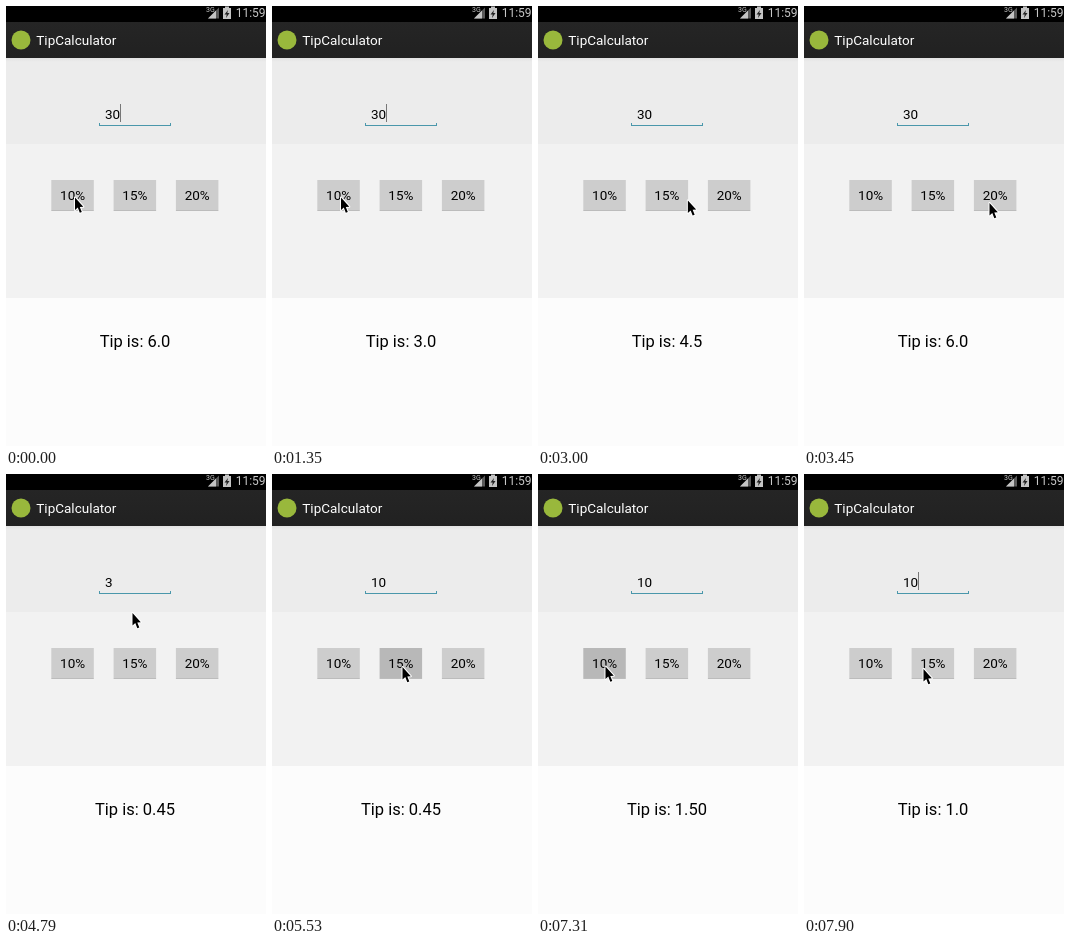
Animation, 260 px wide and 440 px high, one loop 8000 ms. Source, as an HTML page with a canvas:

```html
<!DOCTYPE html>
<html lang="en">
<head>
<meta charset="utf-8">
<title>Tip calculator</title>
<style>
  html, body { margin: 0; width: 100%; height: 100%; overflow: hidden; background: #fcfcfc; }
  canvas { display: block; width: 260px; height: 440px; }
</style>
</head>
<body>
<canvas></canvas>
<script>
const W = 260, H = 440, LOOP = 8000;
const canvas = document.querySelector('canvas');
const ctx = canvas.getContext('2d');
const dpr = window.devicePixelRatio || 1;
canvas.width = W * dpr;
canvas.height = H * dpr;

// The screen refreshes in ticks, slightly faster in the second part.
const tickAt = ms => Math.floor(Math.min(ms, 3600) / 150 + Math.max(0, ms - 3600) / 148);

// Button taps, in ticks; a new amount shows on press, its tip on release.
const taps = [
  { down: 7, up: 9, button: 0, amount: '30', tip: '3.0' },
  { down: 15, up: 17, button: 1, amount: '30', tip: '4.5' },
  { down: 22, up: 23, button: 2, amount: '30', tip: '6.0' },
  { down: 31, up: 31, button: 1, amount: '3', tip: '0.45' },
  { down: 37, up: 40, button: 1, amount: '10', tip: '1.50' },
  { down: 48, up: 50, button: 0, amount: '10', tip: '1.0' }
];

// Pointer stops: it takes `move` ticks to reach each one, then rests.
const stops = [
  { at: 0, move: 1, x: 69, y: 191.5 },
  { at: 15, move: 5, x: 130.5, y: 193 },
  { at: 23, move: 5, x: 185.5, y: 197 },
  { at: 28, move: 4, x: 126.5, y: 139 },
  { at: 33, move: 1, x: 90, y: 147 },
  { at: 37, move: 1, x: 130.5, y: 193 },
  { at: 46, move: 4, x: 72.5, y: 185 },
  { at: 47, move: 1, x: 67.5, y: 192.5 },
  { at: 53, move: 2, x: 119.5, y: 195 }
];

function pointerAt(tick) {
  let { x, y } = stops[0];
  for (const s of stops) {
    const u = Math.min(1, Math.max(0, (tick - s.at + s.move) / s.move));
    const e = u * u * (3 - 2 * u);
    x += (s.x - x) * e;
    y += (s.y - y) * e;
  }
  return [x, y];
}

function stateAt(tick) {
  const state = { amount: '30', tip: '6.0', pressed: -1 };
  for (const tap of taps) {
    if (tick >= tap.down) state.amount = tap.amount;
    if (tick >= tap.up) state.tip = tap.tip;
    else if (tick >= tap.down) state.pressed = tap.button;
  }
  state.caret = tick % 8.5 < 3;
  return state;
}

function rect(x, y, w, h, color) {
  ctx.fillStyle = color;
  ctx.fillRect(x, y, w, h);
}

function text(str, x, y, size, color, align = 'left') {
  ctx.font = `${size}px Roboto, sans-serif`;
  ctx.textAlign = align;
  ctx.fillStyle = color;
  ctx.fillText(str, x, y);
}

function shape(points, color) {
  ctx.beginPath();
  points.forEach(([x, y]) => ctx.lineTo(x, y));
  ctx.closePath();
  ctx.fillStyle = color;
  ctx.fill();
}

function fade(y, h, from, to) {
  const g = ctx.createLinearGradient(0, y, 0, y + h);
  g.addColorStop(0, from);
  g.addColorStop(1, to);
  rect(0, y, W, h, g);
}

function drawBars() {
  const icon = '#c4c4c4';
  rect(0, 0, W, 16, '#000');
  text('3G', 200, 6, 7, icon);
  shape([[202, 12.5], [213, 12.5], [213, 1.5]], '#5a5a5a');
  shape([[202, 12.5], [210, 12.5], [210, 4.5]], icon);
  rect(219, 0.5, 4, 2, icon);
  rect(217, 2, 8, 11, icon);
  shape([[222, 4], [218.5, 8.5], [220.7, 8.5], [220, 12], [223.5, 7], [221.3, 7]], '#222');
  text('11:59', 229.7, 11, 12, '#c8c8c8');

  fade(16, 36, '#252525', '#212121');
  ctx.beginPath();
  ctx.arc(15, 34, 9.5, 0, Math.PI * 2);
  ctx.fillStyle = '#99b83c';
  ctx.fill();
  text('TipCalculator', 30.3, 38.7, 13.5, '#fff');
}

function drawField(value, caret) {
  const line = '#4a97ab';
  rect(93, 119, 72, 1, line);
  rect(93, 117, 1, 2, line);
  rect(164, 117, 1, 2, line);
  text(value, 99, 112.5, 13.5, '#000');
  if (caret) rect(99 + Math.round(value.length * 7.6), 98, 1, 18, '#777');
}

function drawButton(label, i, down) {
  const x = 45.3 + i * 62.3;
  rect(x, 174, 42.5, 30, down ? '#b8b8b8' : '#cdcdcd');
  rect(x, 204, 42.5, 0.7, '#a5a5a5');
  text(label, x + 21.3, 194, 13.5, '#000', 'center');
}

function drawPointer(x, y) {
  ctx.save();
  ctx.translate(x, y);
  ctx.lineJoin = 'round';
  ctx.strokeStyle = '#fff';
  ctx.lineWidth = 2;
  shape([[0, 0], [0, 12.5], [2.8, 10], [4.8, 15.2], [6.8, 14.4], [4.8, 9.4], [8.3, 9.2]], '#000');
  ctx.stroke();
  ctx.fill();
  ctx.restore();
}

function draw(now) {
  const tick = tickAt(now % LOOP);
  const { amount, tip, pressed, caret } = stateAt(tick);

  ctx.setTransform(dpr, 0, 0, dpr, 0, 0);
  drawBars();
  rect(0, 52, W, 86, '#ececec');
  fade(52, 4, '#e2e2e2', '#ececec');
  rect(0, 138, W, 154, '#f2f2f2');
  rect(0, 292, W, 148, '#fcfcfc');
  drawField(amount, caret);
  ['10%', '15%', '20%'].forEach((label, i) => drawButton(label, i, i === pressed));
  text('Tip is: ' + tip, 129, 340.5, 16.5, '#000', 'center');
  drawPointer(...pointerAt(tick));
  requestAnimationFrame(draw);
}
requestAnimationFrame(draw);
</script>
</body>
</html>
```
